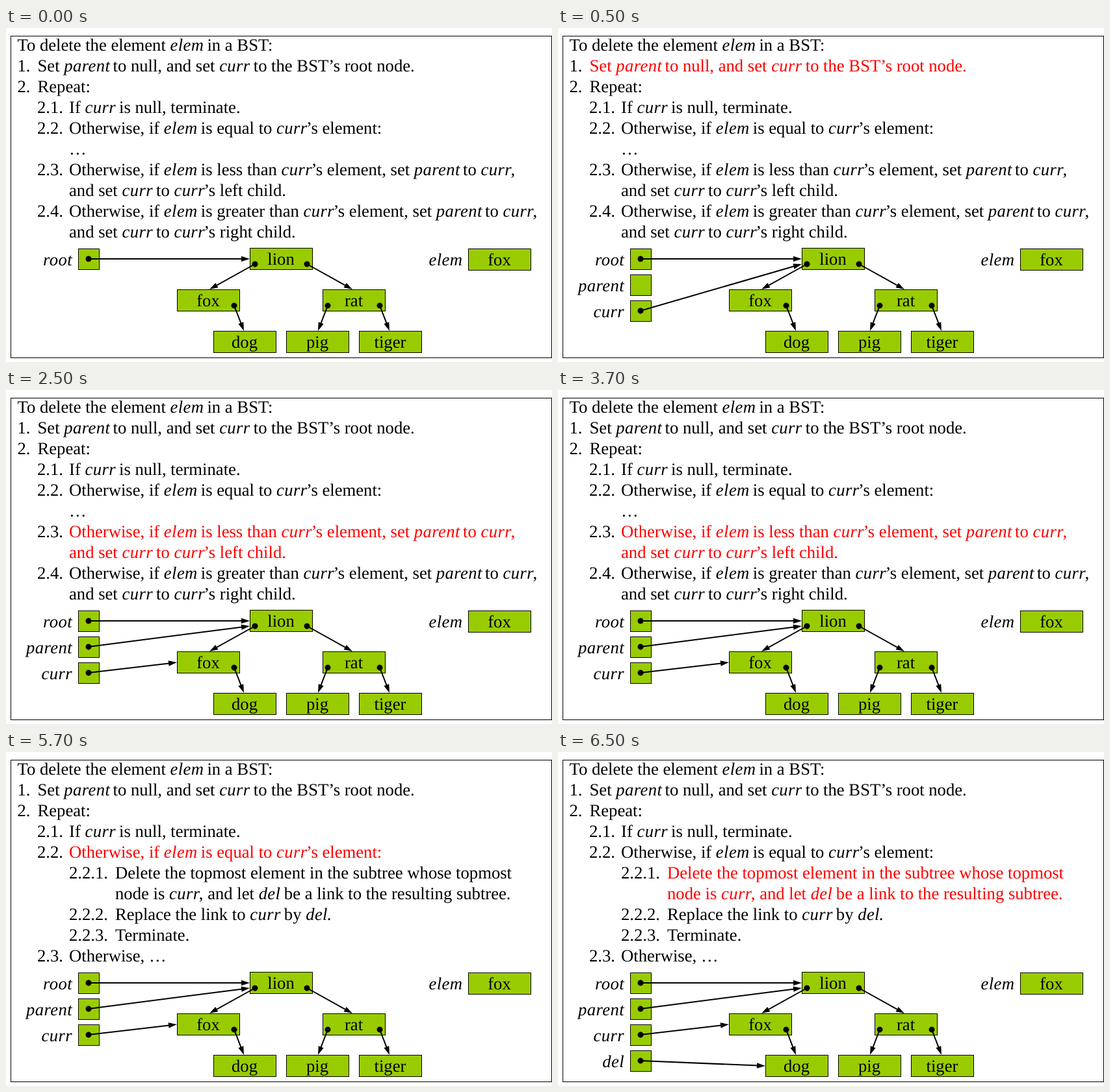
An HTML page that plays this animation: 840 by 515 pixels, repeating every 8 s.

```html
<!DOCTYPE html>
<html lang="en">
<head>
<meta charset="utf-8">
<title>Deleting an element from a BST</title>
<style>
html, body { margin: 0; width: 100%; height: 100%; overflow: hidden; background: #fff; }
svg { display: block; }
text {
  font: 26.667px "Liberation Serif", "Times New Roman", serif;
  text-rendering: geometricPrecision;
  white-space: pre;
}
.i { font-style: italic; }
.red { fill: #f00; }
.node { fill: #9c0; stroke: #000; }
.link { stroke: #000; stroke-width: 2; }
</style>
</head>
<body>
<svg id="stage" width="840" height="515" viewBox="0 0 840 515"></svg>
<script>
const NS = "http://www.w3.org/2000/svg";
const stage = document.getElementById("stage");
const LOOP = 8000;
const STARTS = [0, 500, 2500, 4500, 6500];
const TRACK = 0.4; // extra spacing of italic letters, taken back after the word
const timed = [];

function add(tag, attrs, parent = stage) {
  const el = document.createElementNS(NS, tag);
  for (const key in attrs) el.setAttribute(key, attrs[key]);
  return parent.appendChild(el);
}

// A group visible from step `from` to step `to`, inclusive.
function during(from, to = STARTS.length - 1) {
  const el = add("g", {});
  timed.push({ el, from, to });
  return el;
}

// Words between asterisks are set in italics.
function write(x, y, str, parent = stage, anchor = "start") {
  const el = add("text", { x, y, "text-anchor": anchor }, parent);
  const runs = str.split("*");
  runs.forEach((run, i) => {
    if (!run) return;
    const attrs = i % 2 ? { class: "i", "letter-spacing": TRACK }
      : i ? { dx: -TRACK * runs[i - 1].length } : {};
    add("tspan", attrs, el).textContent = run;
  });
  return el;
}

const line = (x, row, str, parent) => write(x, 35 + 32 * row, str, parent);

function box(x, y, w, h, parent) {
  add("rect", { class: "node", x: x + 0.5, y: y + 0.5, width: w, height: h }, parent);
}

function node(x, y, word) {
  box(x, y, 96, 33);
  write(x + 48, y + 26, word, stage, "middle");
}

function variable(y, name, parent) {
  box(111, y, 32, 32, parent);
  write(102, y + 26, `*${name}*`, parent, "end");
}

function arrow(x1, y1, x2, y2, parent) {
  const angle = Math.atan2(y2 - y1, x2 - x1);
  const len = Math.hypot(x2 - x1, y2 - y1);
  const g = add("g", { transform: `translate(${x1} ${y1}) rotate(${angle * 180 / Math.PI})` }, parent);
  add("path", { class: "link", d: `M0 0H${len - 10}` }, g);
  add("path", { d: `M${len} 0l-13 -4.2v8.4z` }, g);
  add("circle", { r: 4.5 }, g);
}

add("rect", { x: 7.5, y: 12.5, width: 832, height: 496, fill: "none", stroke: "#000" });

// Algorithm text; the last value is the step in which a line is red.
const brief = during(0, 2), full = during(3);
const reds = [];
[
  [17.5, 0, "To delete the element *elem* in a BST:"],
  [17.5, 1, "1."],
  [48.5, 1, "Set *parent* to null, and set *curr* to the BST’s root node.", stage, 1],
  [17.5, 2, "2."],
  [48.5, 2, "Repeat:"],
  [48, 3, "2.1."],
  [97, 3, "If *curr* is null, terminate."],
  [48, 4, "2.2."],
  [97, 4, "Otherwise, if *elem* is equal to *curr*’s element:", stage, 3],
  [97, 5, "…", brief],
  [48, 6, "2.3.", brief],
  [97, 6, "Otherwise, if *elem* is less than *curr*’s element, set *parent* to *curr*,", brief, 2],
  [97, 7, "and set *curr* to *curr*’s left child.", brief, 2],
  [48, 8, "2.4.", brief],
  [97, 8, "Otherwise, if *elem* is greater than *curr*’s element, set *parent* to *curr*,", brief],
  [97, 9, "and set *curr* to *curr*’s right child.", brief],
  [97, 5, "2.2.1.", full],
  [168, 5, "Delete the topmost element in the subtree whose topmost", full, 4],
  [168, 6, "node is *curr*, and let *del* be a link to the resulting subtree.", full, 4],
  [97, 7, "2.2.2.", full],
  [168, 7, "Replace the link to *curr* by *del*.", full],
  [97, 8, "2.2.3.", full],
  [168, 8, "Terminate.", full],
  [48, 9, "2.3.", full],
  [97, 9, "Otherwise, …", full]
].forEach(([x, row, str, parent, step]) => {
  const el = line(x, row, str, parent);
  if (step) reds.push({ el, step });
});

// Tree
node(375, 339, "lion");
node(263, 403, "fox");
node(487, 403, "rat");
node(319, 467, "dog");
node(431, 467, "pig");
node(543, 467, "tiger");
arrow(383, 364, 313, 403);
arrow(463, 364, 533, 403);
arrow(351, 428, 366, 467);
arrow(495, 428, 480, 467);
arrow(575, 428, 590, 467);

// Variables and their links
variable(340, "root");
arrow(127, 356, 375, 356);
write(702.5, 366, "*elem*", stage, "end");
node(711, 340, "fox");

const locals = during(1);
variable(380, "parent", locals);
variable(420, "curr", locals);
arrow(127, 436, 375, 364, during(1, 1));

const moved = during(2);
arrow(127, 396, 375, 364, moved);
arrow(127, 436, 263, 420, moved);

const del = during(4);
variable(460, "del", del);
arrow(127, 476, 319, 484, del);

let shown = -1;
function show(step) {
  if (step === shown) return;
  shown = step;
  for (const { el, from, to } of timed)
    el.setAttribute("display", step >= from && step <= to ? "inline" : "none");
  for (const r of reds) r.el.classList.toggle("red", r.step === step);
}

function tick() {
  const t = performance.now() % LOOP;
  show(STARTS.filter(s => s <= t).length - 1);
  requestAnimationFrame(tick);
}
show(0);
tick();
</script>
</body>
</html>
```
